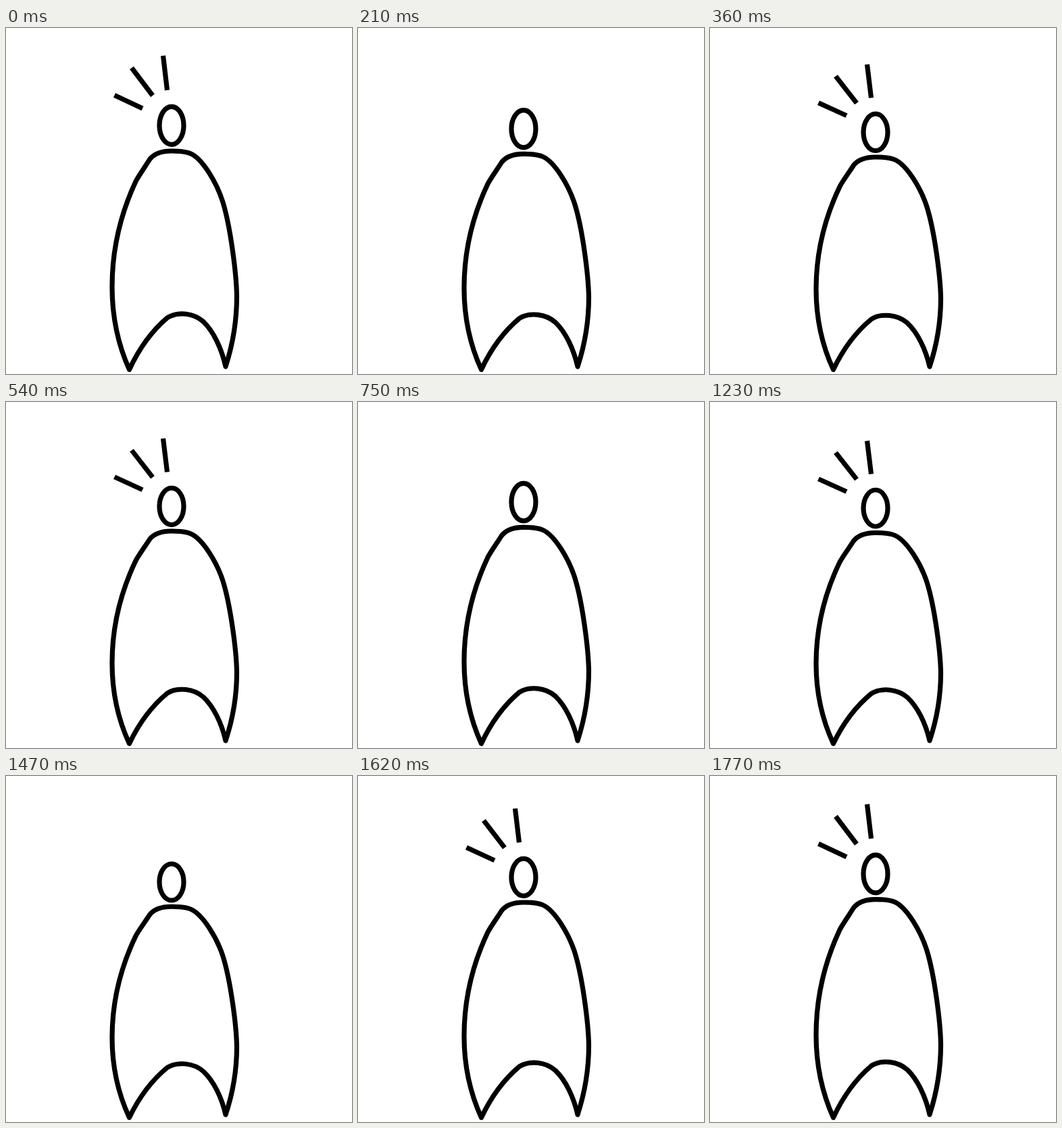
An HTML page for the animation above (1.8 s loop, 512 by 512 pixels).

```html
<!DOCTYPE html>
<html lang="en">
<head>
<meta charset="utf-8">
<title>Bobbing figure</title>
<style>
  html, body { margin: 0; width: 100%; height: 100%; overflow: hidden; background: #fff; }
  svg { display: block; width: 100vw; height: 100vh; }
</style>
</head>
<body>
<svg viewBox="0 0 512 512" fill="none" stroke="#000" stroke-width="7.2" stroke-linejoin="round">
  <g id="figure">
    <path id="rays" d="M160.5 99.5L202 119M186 59L217 100M232.5 41L238.5 92"/>
    <ellipse cx="245" cy="144.3" rx="18" ry="28"/>
    <path d="M182.5 505.5C166 469 157 428 157 383C157 323 171 272 192 227
      C196 219 208 202 212.5 194.5C219 186 231 182 245 182C256 182 268 183.5 273.5 186
      C291 194 312 229 321 258C332 294 341 363 341.5 397C341.5 435 335 470 325 501
      C319 474 307 449 292 434.5C278 422 255 419 239 428.5C216 448 197 474 182.5 505.5Z"/>
  </g>
</svg>
<script>
  const LOOP = 1800, STEP = 30, BEAT = 450, FLOOR = 506;
  const squash = [0, 0.0305, 0.0039, 0.0417, 0.0012]; // height lost at each beat
  const blink = { period: 600, off: 90, on: 330 };
  const figure = document.getElementById('figure');
  const rays = document.getElementById('rays');

  const ease = p => (1 - Math.cos(Math.PI * p)) / 2;

  function squashAt(t) {
    const i = Math.floor(t / BEAT);
    return squash[i] + (squash[i + 1] - squash[i]) * ease(t / BEAT - i);
  }

  function draw() {
    const t = Math.floor(performance.now() % LOOP / STEP) * STEP;
    const s = squashAt(t);
    figure.setAttribute('transform', `matrix(1 0 0 ${1 - s} 0 ${FLOOR * s})`);
    const phase = t % blink.period;
    const hidden = phase >= blink.off && phase < blink.on;
    rays.setAttribute('visibility', hidden ? 'hidden' : 'visible');
    requestAnimationFrame(draw);
  }
  draw();
</script>
</body>
</html>
```
